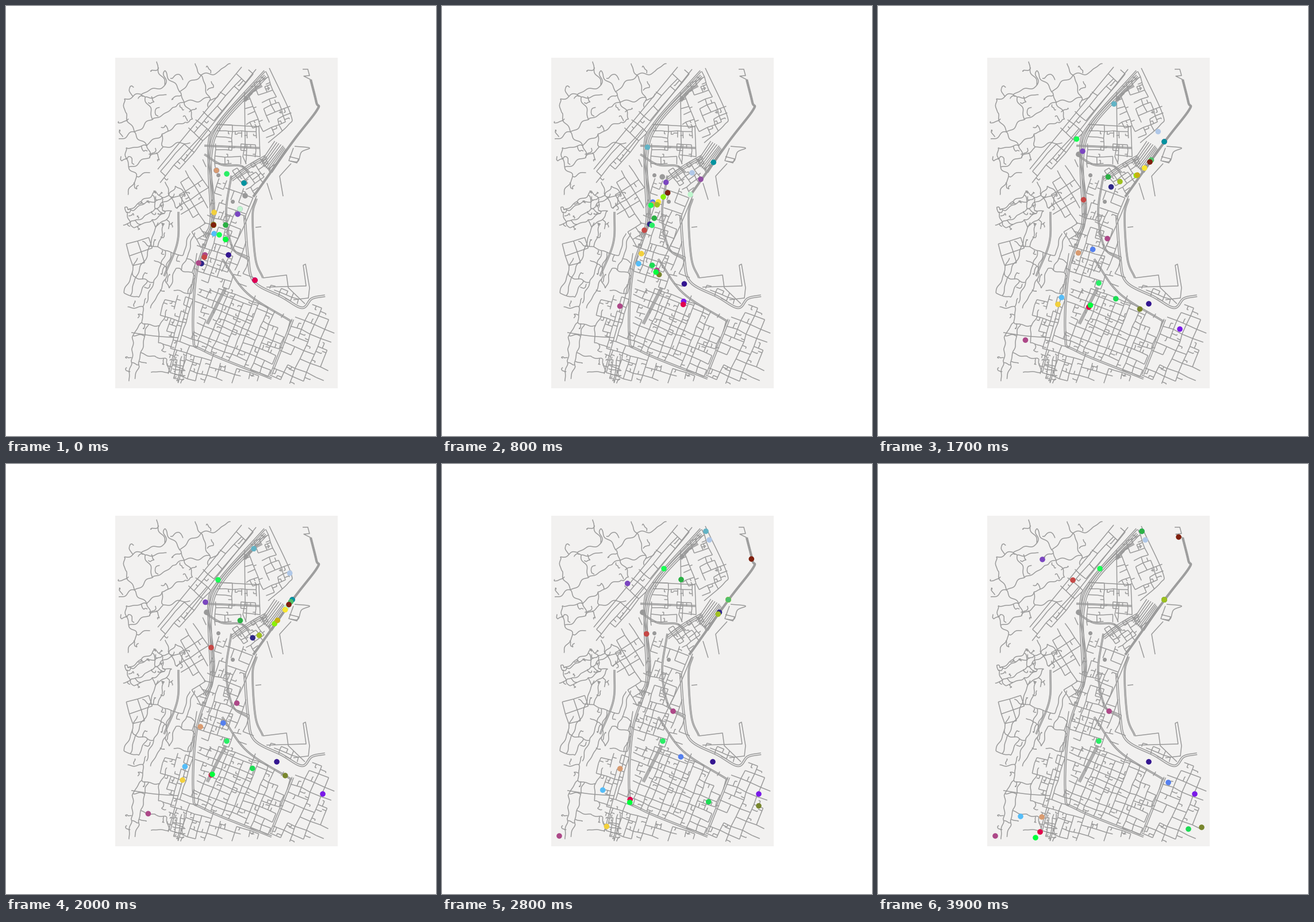
Animation, 748 px wide and 748 px high, one loop 4000 ms. Source, as a matplotlib script:

```python
import numpy as np
import matplotlib.pyplot as plt
from matplotlib.animation import FuncAnimation
from matplotlib.collections import LineCollection
from matplotlib.patches import Rectangle
from matplotlib.path import Path

SIZE, DPI, FRAMES = 748, 100, 40
PX = 72 / DPI
ROAD, LAND = "#999999", "#f2f1f0"
rng = np.random.default_rng(12)
lines = []


def normals(p):
    d = np.gradient(p, axis=0)
    return np.c_[-d[:, 1], d[:, 0]] / np.maximum(np.hypot(*d.T), 1e-6)[:, None]


def road(*xy, lanes=(0,)):
    """Smooth road through a few points, with parallel lanes."""
    p = np.reshape(xy, (-1, 2)).astype(float)
    q = np.vstack([2 * p[0] - p[1], p, 2 * p[-1] - p[-2]])
    t = np.linspace(0, 1, 10, endpoint=False)[:, None]
    bits = [0.5 * (2 * b + (c - a) * t + (2 * a - 5 * b + 4 * c - d) * t**2
                   + (3 * b - a - 3 * c + d) * t**3)
            for a, b, c, d in zip(q, q[1:], q[2:], q[3:])]
    p = np.vstack(bits + [p[-1:]])
    lines.extend(p + off * normals(p) for off in lanes)


def street(*xy):
    lines.append(np.reshape(xy, (-1, 2)))


def bend(p, q, wind):
    """Line from p to q, winding by about the given number of pixels."""
    if not wind:
        return np.array([p, q])
    d = q - p
    size = np.hypot(*d)
    t = np.linspace(0, 1, max(4, int(size / 2.5)))
    a, b = rng.uniform(0, 6.3, 2)
    w = np.sin(t * size / 8 + a) + 0.6 * np.sin(t * size / 4 + b)
    w *= wind * np.sin(np.pi * t) ** 0.5
    return p + t[:, None] * d + w[:, None] * np.array([-d[1], d[0]]) / size


def grid(*xy, angle=0, du=16, dv=16, keep=0.8, stub=0.3, jitter=0.6, wind=0):
    """Uneven street grid with dead ends inside a polygon."""
    poly = np.reshape(xy, (-1, 2))
    inside = Path(poly).contains_point
    mid = poly.mean(0)
    a = np.radians(angle)
    u, v = np.array([[np.cos(a), np.sin(a)], [-np.sin(a), np.cos(a)]])
    reach = np.hypot(*(poly - mid).T).max()
    nu, nv = int(reach / du) + 1, int(reach / dv) + 1
    us = du * (np.arange(-nu, nu + 1) + rng.uniform(-0.2, 0.2, 2 * nu + 1))
    vs = dv * (np.arange(-nv, nv + 1) + rng.uniform(-0.2, 0.2, 2 * nv + 1))
    node = mid + us[:, None, None] * u + vs[None, :, None] * v
    node = node + rng.normal(0, jitter, node.shape)
    for i in range(2 * nu):
        for j in range(2 * nv):
            p = node[i, j]
            for q, side in ((node[i + 1, j], v * dv), (node[i, j + 1], u * du)):
                if not inside((p + q) / 2) or rng.random() > keep:
                    continue
                lines.append(bend(p, q, wind))
                if rng.random() < stub:
                    m = p + (q - p) * rng.uniform(0.25, 0.75)
                    e = m + side * rng.uniform(0.3, 0.6) * rng.choice([-1, 1])
                    f = e + (q - p) * rng.uniform(-0.3, 0.3)
                    lines.extend([bend(m, e, wind), bend(e, f, wind)])


# Motorway and main roads
road(450, 113, 370, 203, 352, 250, 361, 362, 332, 460, 326, 575, 345, 600, 462, 648,
     lanes=(-1.3, 1.3))
road(452, 122, 376, 203, 355, 262, 358, 370, 346, 403, lanes=(-3, 0, 3))
road(445, 138, 430, 147, 415, 165, lanes=(-2, 0, 2))
road(345, 258, 375, 276, 408, 278, 424, 290, lanes=(-1, 1))
road(392, 302, 420, 281, 453, 262, lanes=(-3, 0, 3))
road(392, 295, 383, 360, 394, 420, 420, 440, lanes=(-1, 1))
road(436, 330, 413, 385, 375, 462)
road(376, 440, 420, 500, 497, 549, lanes=(-1, 1))
road(382, 490, 350, 553, lanes=(-2, 0, 2))
road(332, 430, 320, 500, 282, 640)
road(499, 545, 461, 641, lanes=(-1.5, 1.5))
road(300, 358, 298, 412, 275, 470, lanes=(-1, 1))
road(218, 568, 258, 574, 300, 577)
road(345, 243, 442, 247, lanes=(-1, 1))
street(415, 150, 416, 240, 412, 262, 418, 275)
street(368, 206, 440, 210, 442, 262, 414, 259)
street(410, 106, 264, 284)
street(435, 110, 310, 268)

# Coast: shore road, wharves, rail yard and pier
road(415, 365, 421, 437, 432, 480, 480, 506, 515, 525, 532, 509, 555, 504,
     lanes=(-1.5, 1.5))
road(436, 335, 429, 365, 434, 440, 447, 473, lanes=(-1, 1))
street(447, 473, 488, 468, 491, 490, 520, 518)
street(453, 489, 522, 487, 517, 451, 521, 449, 528, 490, 526, 508, 500, 511)
for k in range(-4, 5):
    street(452 + 2.6 * k, 282 + 2 * k, 482 + 2.6 * k - abs(k), 243 + 2 * k)
road(430, 332, 498, 237, 541, 181, 540, 168, 530, 128, lanes=(-1.3, 0, 1.3))
street(530, 128, 518, 122, 528, 121, 525, 110, 516, 110)
road(495, 270, 508, 270, 514, 254, 528, 247, 502, 244)
street(493, 262, 509, 266, 506, 273, 492, 269, 500, 247)
street(496, 274, 476, 296, 482, 331)
street(454, 308, 463, 337)
street(434, 385, 444, 384)
road(458, 108, 495, 188, 491, 207, 456, 238)

# Street grids, south to north
grid(335, 505, 375, 490, 430, 505, 500, 550, 462, 648, 345, 600, 326, 570,
     angle=22, du=15, dv=12.5, keep=0.84)
grid(500, 550, 545, 515, 568, 560, 550, 652, 466, 652, angle=23, du=18, dv=16)
grid(268, 515, 325, 503, 328, 580, 345, 603, 455, 648, 290, 652,
     angle=17, du=15, dv=13, keep=0.76, stub=0.4)
grid(292, 612, 312, 612, 310, 655, 290, 650, angle=8, du=6, dv=8)
grid(445, 482, 490, 492, 515, 518, 500, 520, angle=22, du=11, dv=8, stub=0)
grid(388, 312, 434, 330, 416, 375, 424, 472, 395, 455, 382, 385,
     angle=21, du=17, dv=14, keep=0.9, stub=0.1)
grid(360, 300, 385, 305, 395, 460, 425, 490, 335, 505, 335, 440,
     angle=18, du=13, dv=14, keep=0.66, stub=0.4)
grid(388, 288, 445, 262, 468, 275, 430, 330, angle=-35, du=10, dv=8)
grid(372, 205, 440, 210, 440, 265, 362, 280, 355, 240,
     angle=2, du=13, dv=11, keep=0.62, stub=0.4)
grid(415, 150, 455, 115, 495, 190, 460, 235, 420, 205,
     angle=-22, du=14, dv=12, keep=0.62, stub=0.35)
grid(255, 300, 405, 110, 440, 115, 355, 215, 345, 245, 290, 305,
     angle=-49, du=21, dv=12, keep=0.7, stub=0.15)
grid(300, 300, 350, 265, 355, 350, 340, 420, 305, 400,
     angle=-32, du=17, dv=16, keep=0.7, stub=0.2)
grid(208, 412, 265, 398, 250, 455, 215, 452, angle=-17, du=21, dv=19, stub=0)

# Winding hill roads, north to south
grid(206, 115, 405, 106, 330, 200, 265, 285, 215, 330, 205, 290,
     angle=-25, du=32, dv=29, keep=0.72, stub=0.45, jitter=6, wind=2.6)
grid(206, 350, 285, 308, 318, 330, 290, 385, 206, 385,
     angle=-30, du=17, dv=13, keep=0.78, stub=0.4, jitter=3, wind=2)
grid(262, 385, 332, 400, 326, 500, 212, 508, 202, 465,
     angle=20, du=14, dv=34, keep=0.66, stub=0.25, jitter=3, wind=1.6)
grid(208, 645, 225, 515, 275, 505, 285, 645,
     angle=12, du=23, dv=25, keep=0.7, stub=0.5, jitter=4, wind=1.8)

# Dots run at even speed along a path, then stay
tracks, colors = [], []


def trip(color, path, when=(0, 39), done=None):
    """Share `done` of the path is covered at the frames in `when`."""
    p = np.reshape(path, (-1, 2))
    s = np.r_[0, np.cumsum(np.hypot(*np.diff(p, axis=0).T))]
    at = s[-1] * np.interp(np.arange(FRAMES), when, done or (0, 1))
    tracks.append(np.c_[np.interp(at, s, p[:, 0]), np.interp(at, s, p[:, 1])])
    colors.append(color)


harbour = (361, 381, 376, 341, 390, 327, 414, 308, 454, 293, 474, 270, 498, 236)
shore = (407, 353, 432, 328, 451, 300, 498, 236)

trip("#999999", (416, 330, 383, 297, 349, 258), (0, 17))
trip("#62b3c5", (366, 286, 357, 244, 413, 167, 459, 117), (4, 24))
trip("#b0c8e8", (403, 362, 433, 293, 489, 216, 494, 188, 465, 132), (0, 26.6))
trip("#9150a3", shore, (3.5, 13.4))
trip("#00939f", harbour[6:], (0, 13))
trip("#bdf5cd", shore, (3.6, 22))
trip("#7a1ae8", (433, 477, 420, 515, 460, 540, 528, 563, 551, 574), (5, 19.2))
trip("#5580ee", (366, 286, 367, 380, 382, 478, 430, 523, 505, 554), (2, 39))
trip("#d99b70", (366, 286, 367, 380, 324, 495, 292, 573, 285, 614), (2, 37))
trip("#8af00a", harbour, (1.4, 26.2))
trip("#78862d", (361, 380, 373, 461, 404, 502, 543, 570, 563, 632), (0, 31.5))
trip("#c8b010", harbour, (4.1, 24.3))
trip("#2e2688", (340, 448) + harbour, (0, 31))
trip("#f7e630", harbour, (4.4, 21.8))
trip("#4fbf6a", harbour, (2.3, 20.4))
trip("#9fc020", harbour, (2.6, 32.4))
trip("#7f1f0c", harbour + (541, 181, 534, 140, 523, 127), (2, 21, 24, 30), (0, 0.62, 0.62, 1))
trip("#7b46c0", (403, 362, 389, 304, 357, 254, 308, 188, 286, 166), (0, 17, 39), (0, 0.52, 1))
trip("#f2d03c", (362, 359, 351, 420, 311, 524, 299, 603, 282, 640), (1, 29))
trip("#55bdf8", (362, 396, 317, 513, 296, 562, 258, 574, 248, 613), (0, 37))
trip("#ad4888", (346, 433, 375, 461, 401, 400, 402, 430), (2.5, 22))
trip("#ad4888", (335, 447, 296, 562, 258, 574, 251, 606, 216, 628, 204, 647), (0, 26))
trip("#c64846", (345, 437, 358, 350, 356, 297, 349, 258, 339, 202),
     (0, 24, 33, 39), (0, 0.6, 0.6, 1))
trip("#331590", (387, 433, 426, 490, 471, 518), (0, 16))
trip("#2bb044", (382, 381, 369, 370, 379, 322, 405, 292, 421, 160, 459, 117), (6, 39))
trip("#2aee66", (384, 292, 364, 388, 384, 482), (0, 17))
trip("#1cdc54", (382, 406, 362, 445, 384, 482, 420, 515, 476, 608, 540, 635), (2, 39))
trip("#e0004f", (433, 477, 426, 522, 399, 510, 370, 518, 347, 559, 282, 640))
trip("#18ff54", (371, 398, 356, 297, 345, 229, 386, 182), (4, 22))
trip("#00ff3c", (382, 406, 370, 459, 387, 489, 341, 572, 274, 650))
tracks = np.array(tracks)

fig = plt.figure(figsize=(SIZE / DPI, SIZE / DPI), dpi=DPI, facecolor="white")
ax = fig.add_axes([0, 0, 1, 1])
ax.set(xlim=(0, SIZE), ylim=(SIZE, 0))
ax.axis("off")
ax.add_patch(Rectangle((190, 90), 387, 575, fc=LAND, lw=0))
ax.add_collection(LineCollection(lines, colors=ROAD, linewidths=1.5 * PX, zorder=2))
ax.scatter([394, 369, 417], [340, 294, 160], s=(7 * PX) ** 2, c=ROAD, lw=0, zorder=2)
dots = ax.scatter(*tracks[:, 0].T, s=(9.6 * PX) ** 2, c=colors, lw=0, zorder=3)


def update(frame):
    dots.set_offsets(tracks[:, frame])
    return (dots,)


anim = FuncAnimation(fig, update, frames=FRAMES, interval=100, repeat=True, repeat_delay=0)
plt.show()
```
